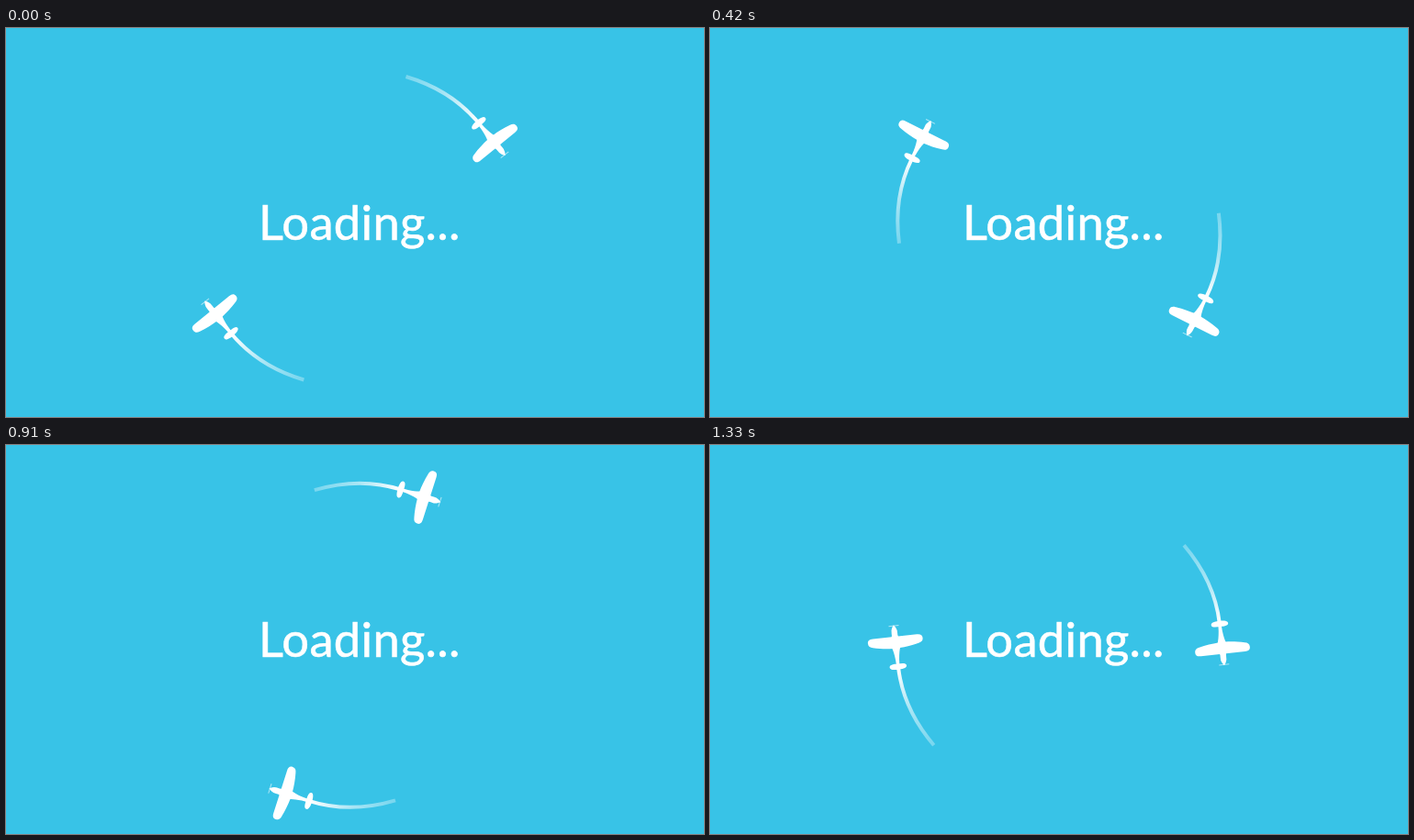
These frames come from a looping animation (760x424 px, 1.4 s). An HTML page:

```html
<!DOCTYPE html>
<html lang="en">
<head>
<meta charset="utf-8">
<title>Loading</title>
<style>
  html, body { margin: 0; height: 100%; overflow: hidden; background: #38c3e7; }
  svg { display: block; }
  text { font: 52.5px Lato, sans-serif; letter-spacing: .3px; fill: #fff; stroke: #fff; stroke-width: .6px; }
</style>
</head>
<body>
<svg width="760" height="424" viewBox="0 0 760 424">
  <defs>
    <linearGradient id="fade" gradientUnits="userSpaceOnUse" x1="137" y1="-107" x2="175" y2="-22">
      <stop offset="0" stop-color="#fff" stop-opacity=".32"/>
      <stop offset=".5" stop-color="#fff" stop-opacity=".57"/>
      <stop offset="1" stop-color="#fff"/>
    </linearGradient>
    <!-- Plane and trail, placed relative to the centre of the circle -->
    <g id="flyer">
      <path d="M137.4 -107.5Q170.5 -68 175.4 -22" fill="none" stroke="url(#fade)" stroke-width="4"/>
      <g transform="translate(178.3 6) rotate(-5.8)" fill="#fff">
        <path d="M-30 .5C-30 4 -28 5.2 -24 5.2H24C28 5.2 30 4 30 .5C30 -2.5 28 -3.8 25 -4.4C18 -6.2 10 -7.2 4 -7.5H-4C-10 -7.2 -18 -6.2 -25 -4.4C-28 -3.8 -30 -2.5 -30 .5Z"/>
        <path d="M-1.5 -30H1.5L2 -20Q3 -10 5 -6H-5Q-3 -10 -2 -20Z"/>
        <path d="M-9.3 -27.5C-9.3 -24.3 -4 -24.5 0 -24.5S9.3 -24.3 9.3 -27.5S3 -31 0 -31S-9.3 -30.5 -9.3 -27.5Z"/>
        <path d="M-4 4Q-2.8 6 -3.2 9T-2 15L0 18L2 15Q3.6 12 3.2 9T4 4Z"/>
        <path d="M-5.5 17H5.5" stroke="#fff" stroke-opacity=".6"/>
      </g>
    </g>
  </defs>
  <text x="275" y="231">Loading...</text>
  <use id="right" href="#flyer"/>
  <use id="left" href="#flyer"/>
</svg>
<script>
  const STEP_MS = 70, STEPS = 20, START = -213.5;
  const NOTCH = 3, NOTCHES_PER_STEP = 3.78; // the circle turns in whole notches of 3 degrees

  function place(id, x, y, angle) {
    document.getElementById(id).setAttribute('transform', `translate(${x} ${y}) rotate(${angle})`);
  }

  function draw() {
    const step = Math.floor(performance.now() / STEP_MS) % STEPS;
    const angle = START + NOTCH * Math.ceil(step * NOTCHES_PER_STEP - 0.95);
    place('right', 379.6, 218, angle);
    place('left', 380.2, 218.5, angle + 180);
    requestAnimationFrame(draw);
  }
  draw();
</script>
</body>
</html>
```
